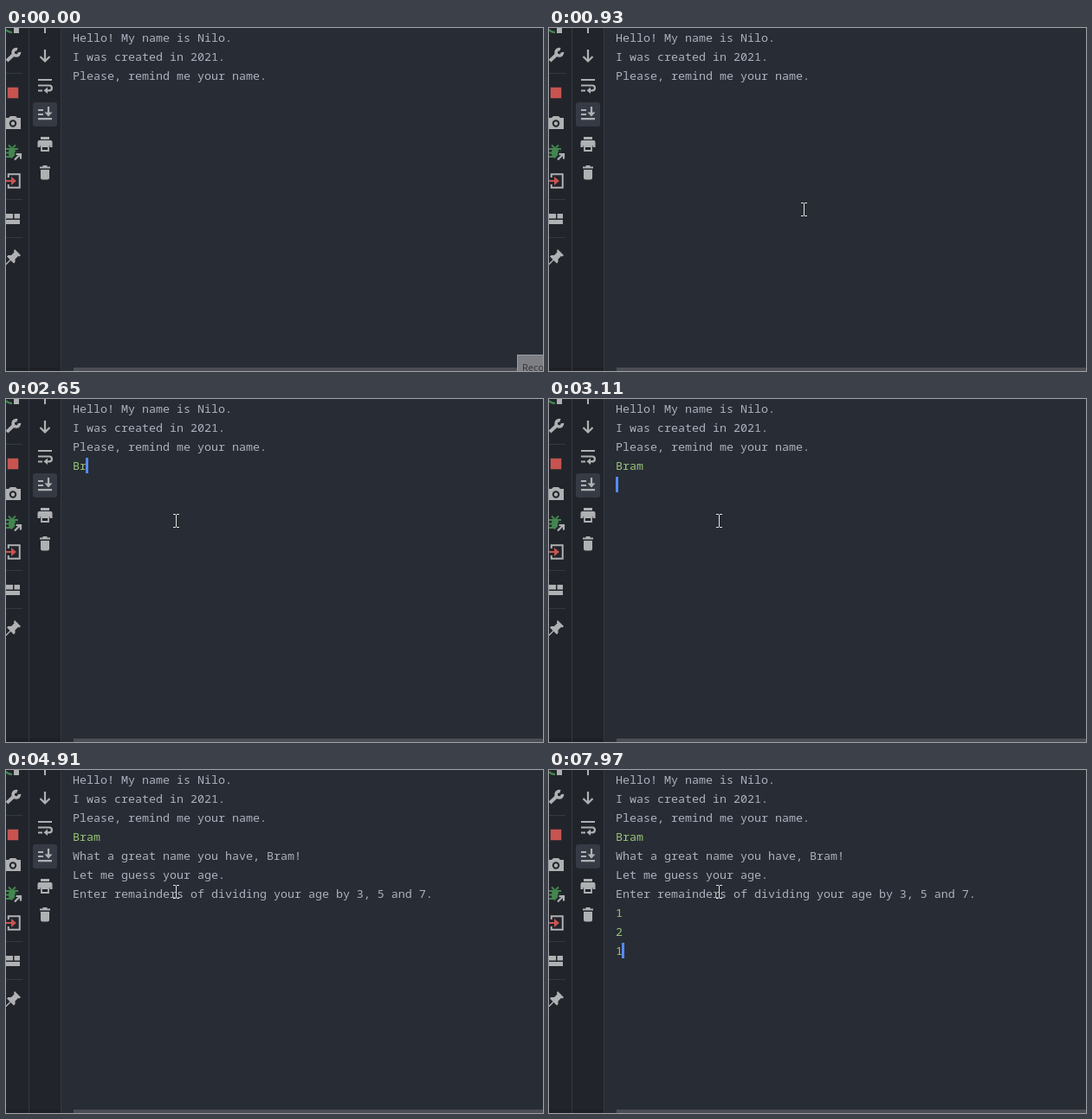
An HTML page for the animation above (8000 ms loop, 620 by 397 pixels).

```html
<!DOCTYPE html>
<html lang="en">
<head>
<meta charset="utf-8">
<title>Console session</title>
<style>
  html, body { margin: 0; width: 100%; height: 100%; overflow: hidden; background: #282c34; }
  #stage { position: relative; width: 620px; height: 397px; overflow: hidden; }
  svg { position: absolute; left: 0; top: 0; }

  pre {
    position: absolute; left: 77px; top: calc(22px * var(--row)); margin: 0; color: #abb2bf;
    font: 13.333px/22px "Noto Sans Mono", "DejaVu Sans Mono", monospace;
    font-variant-ligatures: none;
  }
  .in { color: #98c379; }

  .timed { animation: 8s step-end infinite; }
  #name { width: 0; overflow: hidden; animation-name: type; }
  #reply { animation-name: reply; }
  #first { animation-name: first; }
  #second { animation-name: second; }
  #third { animation-name: third; }
  #caret {
    position: absolute; left: 0; top: 0; width: 3px; height: 18px;
    background: #568af2; animation-name: caret;
  }
  #mouse { animation-name: mouse; }
  #tip {
    position: absolute; left: 590px; top: 378px; width: 60px; height: 30px; box-sizing: border-box;
    border: 1px solid #9a9ba0; background: #7d7f85; color: #30333a; padding: 7px 0 0 5px;
    font: 11px/14px "Open Sans", "Noto Sans", sans-serif; animation-name: tip;
  }

  @keyframes tip { 0% { opacity: 1 } 0.875%, 100% { opacity: 0 } }
  @keyframes type {
    0% { width: 0 } 30.625% { width: 8px } 33.125% { width: 16px }
    34.75% { width: 24px } 35.625%, 100% { width: 34px }
  }
  @keyframes reply { 0% { opacity: 0 } 41.375%, 100% { opacity: 1 } }
  @keyframes first { 0% { opacity: 0 } 75.5%, 100% { opacity: 1 } }
  @keyframes second { 0% { opacity: 0 } 85.5%, 100% { opacity: 1 } }
  @keyframes third { 0% { opacity: 0 } 99.625%, 100% { opacity: 1 } }

  @keyframes caret {
    0% { opacity: 0; transform: translate(77px, 68px) }
    16.5% { opacity: 1 }
    23.25% { opacity: 0 }
    29.875% { opacity: 1 }
    30.625% { transform: translate(84px, 68px) }
    33.125% { transform: translate(92px, 68px) }
    34.75% { transform: translate(100px, 68px) }
    35.625% { transform: translate(108px, 68px) }
    38.875% { transform: translate(77px, 90px) }
    41.375% { transform: translate(77px, 156px) }
    48.875% { opacity: 0 }
    54.75% { opacity: 1 }
    61.375% { opacity: 0 }
    67.25% { opacity: 1 }
    73.875% { opacity: 0 }
    75.5% { opacity: 1; transform: translate(84px, 156px) }
    78.875% { transform: translate(77px, 178px) }
    85.5% { transform: translate(84px, 178px) }
    92.25% { opacity: 0 }
    95.5% { opacity: 1; transform: translate(77px, 200px) }
    99.625%, 100% { opacity: 1; transform: translate(84px, 200px) }
  }

  @keyframes mouse {
    0% { transform: translate(700px, 450px) }
    5.75% { transform: translate(614px, 394px) }
    6.625% { transform: translate(540px, 389px) }
    7.375% { transform: translate(507px, 367px) }
    8.25% { transform: translate(478px, 351px) }
    9.125% { transform: translate(456px, 333px) }
    9.875% { transform: translate(408px, 304px) }
    10.75% { transform: translate(347px, 258px) }
    11.625% { transform: translate(294px, 210px) }
    12.375% { transform: translate(265px, 187px) }
    13.25% { transform: translate(240px, 167px) }
    14.125% { transform: translate(217px, 153px) }
    14.875% { transform: translate(203px, 145px) }
    15.75% { transform: translate(196px, 141px) }
    16.5% { transform: translate(202px, 144px) }
    17.375% { transform: translate(198px, 142px) }
    18.125%, 100% { transform: translate(196px, 141px) }
  }
</style>
</head>
<body>
<div id="stage">
  <svg width="620" height="397" fill="#afb1b3">
    <!-- panels -->
    <path fill="#21252b" d="M0 0h63v397H0z"/>
    <path fill="#1d2026" d="M0 393h63v4H0z"/>
    <path fill="#343841" d="M26 0h1v397h-1zM63 0h1v397h-1zM0 52h19v1H0zM0 198h19v1H0zM0 242h19v1H0z"/>
    <path fill="#4c4e55" d="M78 393h542v4H78z"/>
    <rect x="31" y="86" width="28" height="28" rx="3" fill="#353a44"/>

    <!-- left column -->
    <path d="M9 0h6v6H9z"/>
    <path d="M0 2q2 3 7 3" fill="none" stroke="#43864f" stroke-width="2.4"/>
    <g fill="none" stroke="#afb1b3">
      <path d="M1 38l8.500-8" stroke-width="4"/>
      <path d="M13 24.800a3.700 3.700 0 1 0 2.500 3.200" stroke-width="3.600"/>
    </g>
    <path fill="#c75450" d="M1.750 68.750h12.500v12.500H1.750z"/>
    <path d="M0 104h3l2-2h6l2 2h4v13H0z"/>
    <circle cx="8" cy="110.500" r="4.200" fill="#21252b"/>
    <circle cx="8" cy="110.500" r="2.200"/>
    <g fill="#43864f" stroke="#43864f">
      <ellipse cx="7" cy="144.500" rx="3.700" ry="6"/>
      <path d="M0 140h14M0 144.500h14M0 149h12M3 135.500l3 3M11 135.500l-3 3" stroke-width="2"/>
    </g>
    <path d="M8.500 152.500l7-7M10 146h7v7" fill="none" stroke="#21252b" stroke-width="5"/>
    <path d="M10 152.500l7-7M11.500 146h5.500v5.500" fill="none" stroke="#afb1b3" stroke-width="2.200"/>
    <path d="M2.750 173v-3.750h13v15.500h-13V181" fill="none" stroke="#afb1b3" stroke-width="2"/>
    <path fill="#c75450" d="M0 176h6v-4l6 5-6 5v-4H0z"/>
    <path d="M0 215h8v5.500H0zM9.500 215h6.500v5.500H9.500zM0 222h16v5H0z"/>
    <path d="M10 256l7 7-1.500 1.500-1.500-.5-3.500 3.500v3.500l-1.500 1.500-3.500-3.500-5 5H0v-1.500l4.500-4.500-3.500-3.500 1.500-1.500H6l3.500-3.500-.5-1.500z"/>

    <!-- right column -->
    <path d="M44 0h2v6h-2z"/>
    <g fill="none" stroke="#afb1b3" stroke-width="2.200">
      <path d="M45 25v13.500M39.500 33l5.500 5.500 5.500-5.500"/>
      <path d="M37 60h16M37 66.500h13a2.800 2.800 0 0 1 0 5.800h-3M37 72.500h5"/>
      <path d="M37 95h6M37 100h6M37 105.200h16M49 91v8"/>
    </g>
    <path d="M43.500 72.300l4.500-3.800v7.600zM44.500 97.500h9l-4.500 5z"/>
    <path d="M40 126h10v3H40zM38.500 130h13q2 0 2 2v6h-3v-2h-11v2h-3v-6q0-2 2-2z"/>
    <path d="M41 137h8v5h-8z" fill="none" stroke="#afb1b3" stroke-width="1.800"/>
    <path d="M39 160.500h3.500v-1.500h5v1.500H51v2H39zM40 164h10v9.500q0 2-2 2h-6q-2 0-2-2z"/>
  </svg>

  <pre style="--row:0">Hello! My name is Nilo.
I was created in 2021.
Please, remind me your name.</pre>
  <pre id="name" class="in timed" style="--row:3">Bram</pre>
  <pre id="reply" class="timed" style="--row:4">What a great name you have, Bram!
Let me guess your age.
Enter remainders of dividing your age by 3, 5 and 7.</pre>
  <pre id="first" class="in timed" style="--row:7">1</pre>
  <pre id="second" class="in timed" style="--row:8">2</pre>
  <pre id="third" class="in timed" style="--row:9">1</pre>

  <div id="caret" class="timed"></div>
  <div id="tip" class="timed">Record</div>
  <svg width="620" height="397">
    <path id="mouse" class="timed" fill="#e4e4e4"
      d="M-3-8h3v1h1v-1h3v1H1V7h3v1H1V7H0v1h-3V7h3V-7h-3z"/>
  </svg>
</div>
</body>
</html>
```
